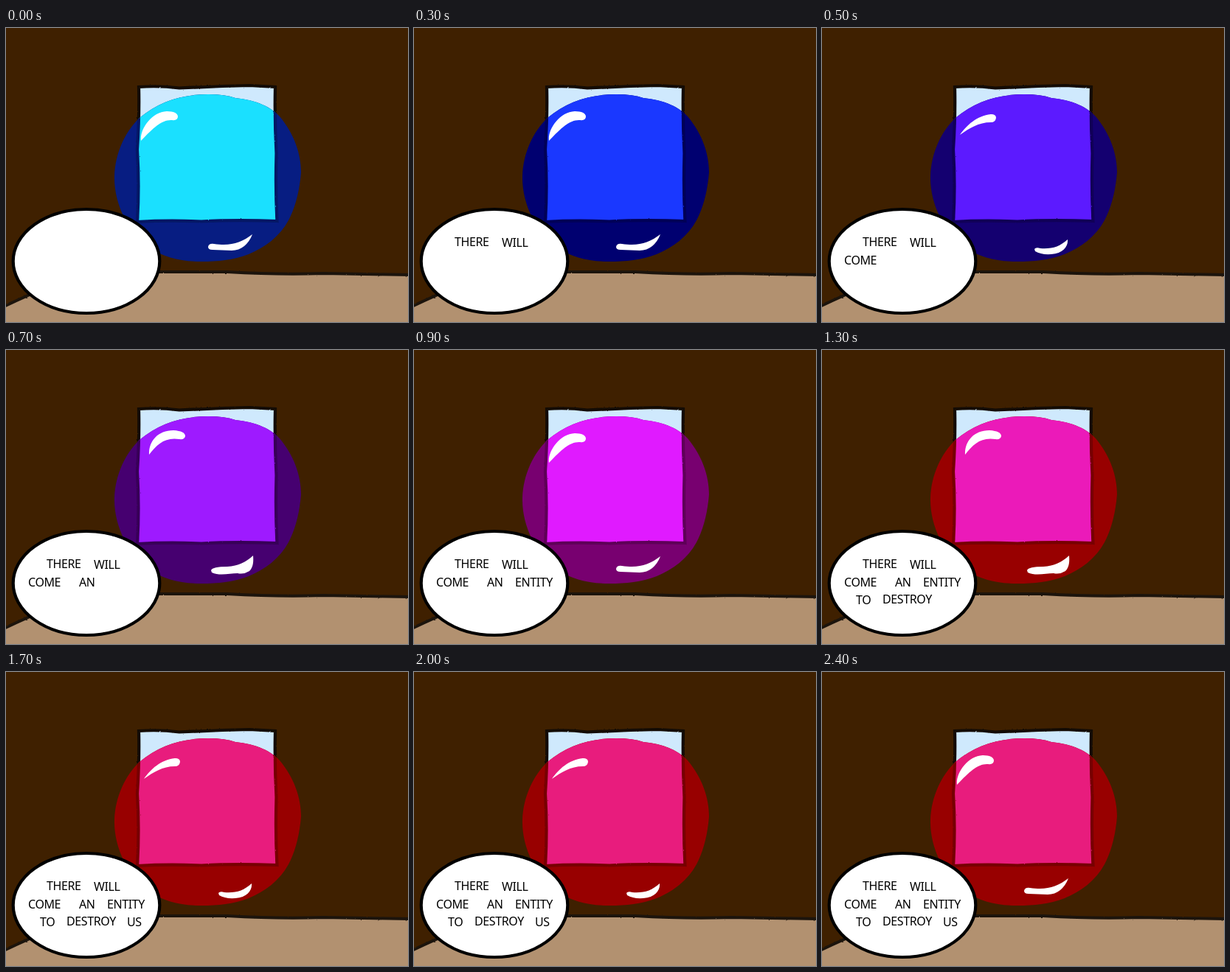
Write an HTML page that moves like this. It is 545 by 399 pixels and loops after 2500 ms.

```html
<!DOCTYPE html>
<html lang="en">
<head>
<meta charset="utf-8">
<title>Crystal ball</title>
<style>
  html, body { margin: 0; width: 100%; height: 100%; overflow: hidden; background: #3f2000; }
  svg { display: block; width: 545px; height: 399px; }
  text { font: 16px "Noto Sans", sans-serif; letter-spacing: -.4px; }
</style>
</head>
<body>
<svg viewBox="0 0 545 399">
  <defs>
    <filter id="rough" filterUnits="userSpaceOnUse" x="-10" y="0" width="570" height="399" color-interpolation-filters="sRGB">
      <feTurbulence type="fractalNoise" baseFrequency=".25" numOctaves="2" seed="4"/>
      <feDisplacementMap in="SourceGraphic" scale="2" xChannelSelector="R" yChannelSelector="G"/>
      <feGaussianBlur stdDeviation=".4"/>
    </filter>
    <path id="pane" d="M180 80 Q208 78 235 81.5 Q290 79 330 78 L365 80 Q364 125 366.5 170 Q365 220 367.5 262 Q310 260 265 262.5 Q220 260.5 178 263 Q181 215 178 165 Q181 120 180 80Z"/>
    <path id="globe" d="M274 90 Q297 90 311 95 C341 98 360 108 371 120 C391 144 400 171 400 196 C398 220 393 242 383 261 C371 283 351 298 329 307 C308 315 287 317 265 317 C236 317 214 311 196 299 C169 281 146 242 147 201 C148 169 162 140 181 122 C207 100 238 90 274 90Z"/>
    <clipPath id="inPane"><use href="#pane"/></clipPath>
    <clipPath id="inGlobe"><use href="#globe"/></clipPath>
  </defs>

  <rect width="545" height="399" fill="#3f2000"/>
  <path d="M0 377 L32 362 L120 331 L300 331 Q370 335 430 333 L545 335 V399 H0Z" fill="#b29170"/>
  <path d="M-5 379 Q14 370 32 362 M200 331 L300 331 Q370 335 430 333 L550 335" fill="none" stroke="#1c140c" stroke-width="4" filter="url(#rough)"/>

  <use href="#pane" fill="#cfe9fd"/>
  <use href="#pane" fill="none" stroke="#130b04" stroke-width="4.2" filter="url(#rough)"/>
  <use id="outer" href="#globe"/>
  <g clip-path="url(#inPane)"><use id="inner" href="#globe"/></g>
  <g clip-path="url(#inGlobe)">
    <use id="edge" href="#pane" fill="none" stroke-width="4.2" filter="url(#rough)"/>
  </g>
  <path id="shine" fill="#fff"/>

  <ellipse cx="109" cy="316.5" rx="99.3" ry="70.5" fill="#fff" stroke="#000" stroke-width="4.2"/>
  <g id="speech"></g>
</svg>
<script>
const $ = id => document.getElementById(id);

// step, colour through the window, colour against the wall
const tints = [
  [0, [26, 224, 255], [7, 29, 130]],
  [3, [26, 56, 255], [0, 0, 112]],
  [5, [92, 26, 255], [20, 0, 112]],
  [9, [224, 26, 255], [120, 0, 112]],
  [12, [233, 26, 203], [152, 0, 0]],
  [13, [235, 26, 185], [152, 0, 0]],
  [17, [232, 28, 125], [152, 0, 0]],
  [25, [232, 28, 125], [152, 0, 0]]
];

const shines = [
  "M183 153 C181 138 197 114 218 113 Q232 113 233 120 Q233 126 225 125 C212 124 200 135 183 153Z" +
  "M274 297 Q275 292 282 293 C305 296 318 292 334 280 C329 293 319 302 306 302 L280 301 Q274 301 274 297Z",
  "M194 142 C193 125 205 109 227 109 Q243 110 243 117 Q242 122 235 121 C215 118 205 128 194 142Z" +
  "M278 299 Q280 294 300 294 C315 293 325 288 335 279 C336 290 334 296 330 300 Q322 305 314 303 C303 303 290 307 279 302Z",
  "M187 145 C196 132 210 119 229 117 Q236 117 236 122 Q235 128 229 128 C212 128 200 136 187 145Z" +
  "M288 300 Q290 297 296 299 C312 300 322 297 333 287 C334 296 327 306 311 307 Q297 308 289 303Z"
];

const words = [
  ["THERE", 55, 296], ["WILL", 119, 297], ["COME", 30, 321], ["AN", 99, 321],
  ["ENTITY", 137, 321], ["TO", 46, 345], ["DESTROY", 82, 344], ["US", 164, 345]
].map(([word, x, y]) => {
  const el = document.createElementNS("http://www.w3.org/2000/svg", "text");
  el.textContent = word;
  el.setAttribute("x", x);
  el.setAttribute("y", y);
  return $("speech").appendChild(el);
});

const mix = (a, b, k) => a.map((v, i) => v + (b[i] - v) * k);
const rgb = (c, shade = 1) => `rgb(${c.map(v => Math.round(v * shade))})`;

function draw(now) {
  const step = Math.floor(now % 2500 / 100);
  const i = tints.findIndex(t => t[0] > step);
  const [from, to] = [tints[i - 1], tints[i]];
  const k = (step - from[0]) / (to[0] - from[0]);
  const wall = mix(from[2], to[2], k);

  $("inner").setAttribute("fill", rgb(mix(from[1], to[1], k)));
  $("outer").setAttribute("fill", rgb(wall));
  $("edge").setAttribute("stroke", rgb(wall, .78));
  $("shine").setAttribute("d", shines[step % 3]);
  // one more word every second step
  words.forEach((el, n) => el.setAttribute("visibility", step > 2 * n ? "visible" : "hidden"));
}

const start = performance.now();
(function loop() {
  draw(performance.now() - start);
  requestAnimationFrame(loop);
})();
</script>
</body>
</html>
```
